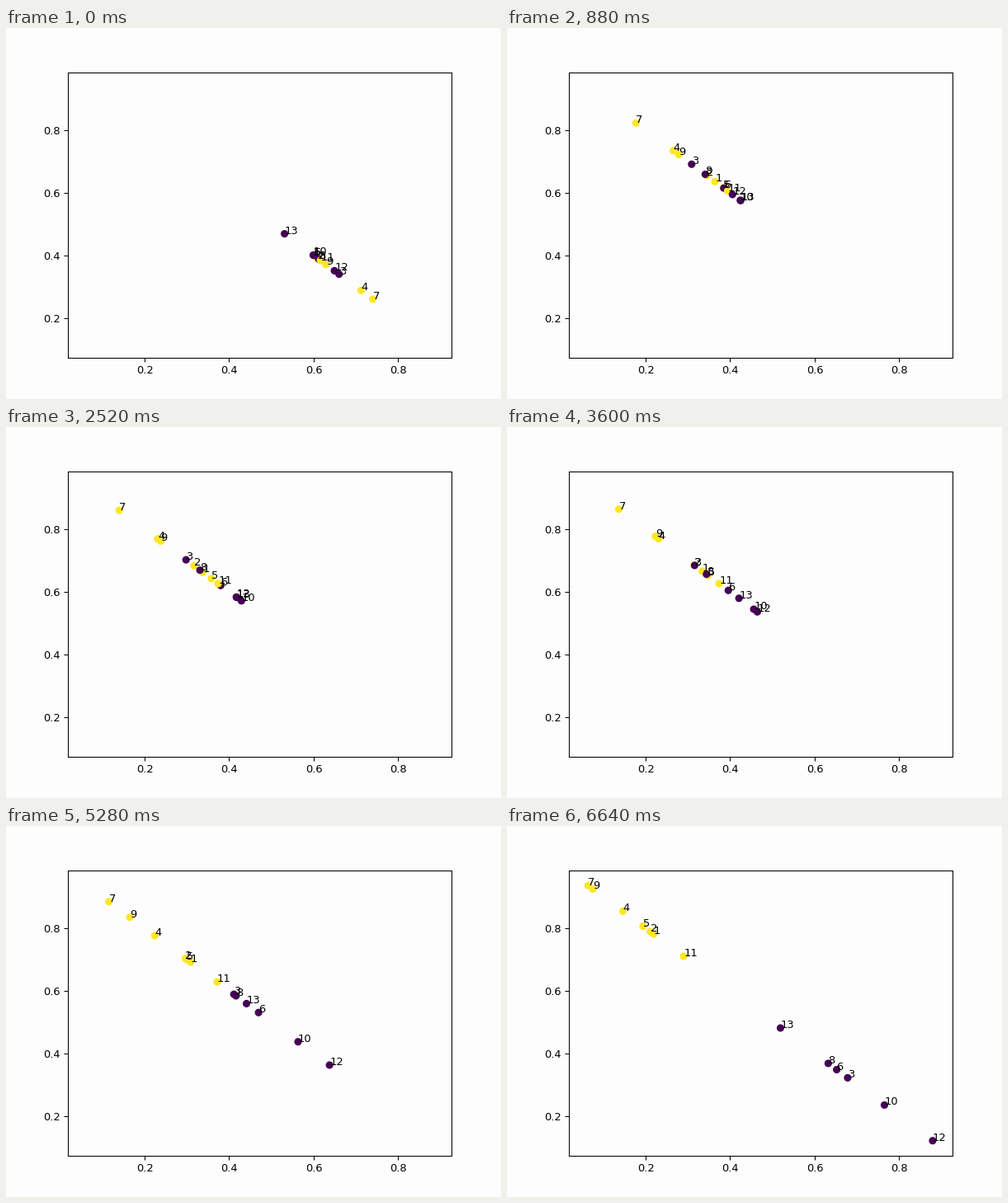
These frames come from a looping animation (600x450 px, 6.68 s). A matplotlib script:

```python
import numpy as np
import matplotlib.pyplot as plt
from matplotlib.animation import FuncAnimation

FRAMES, STEP = 167, 40
END = (FRAMES - 1) * STEP
SPLIT = 2520  # moment when the two classes begin to separate
PURPLE, YELLOW = "#440154", "#fde725"

# Per node: start, plateau and final probability, then growth rate
NODES = [
    (0.616, 0.338, 0.219, 4.4),
    (0.610, 0.317, 0.211, 5.2),
    (0.660, 0.298, 0.678, 3.3),
    (0.712, 0.231, 0.146, 8.0),
    (0.601, 0.358, 0.194, 3.3),
    (0.600, 0.380, 0.652, 3.1),
    (0.740, 0.140, 0.064, 4.0),
    (0.612, 0.331, 0.632, 3.5),
    (0.629, 0.238, 0.075, 3.0),
    (0.599, 0.429, 0.765, 2.7),
    (0.616, 0.374, 0.290, 11.0),
    (0.649, 0.417, 0.879, 2.5),
    (0.531, 0.418, 0.519, 4.3),
]


def logit(p):
    return np.log(p / (1 - p))


def ease(u):
    return (1 - np.cos(np.pi * np.clip(u, 0, 1))) / 2


def probability(t):
    """Overshoot, ring down to the plateau, then drift apart exponentially."""
    rebound = -0.095 * plateau - 0.04 * final
    z = start
    stops = [(520, 1.44 * plateau), (880, plateau + rebound),
             (1240, plateau - 0.2 * rebound), (1600, plateau)]
    begin = 0
    for stop, value in stops:
        z = z + (value - z) * ease((t - begin) / (stop - begin))
        begin = stop
    u = max(0, (t - SPLIT) / (END - SPLIT))
    z = z + (final - plateau) * np.expm1(rate * u) / np.expm1(rate)
    return 1 / (1 + np.exp(-z))


params = np.array(NODES).T
start, plateau, final = logit(params[:3])
rate = params[3]
colors = np.where(final < -0.5, YELLOW, PURPLE)

fig, ax = plt.subplots(figsize=(6.4, 4.8), dpi=93.75, facecolor="#fefdfe")
fig.subplots_adjust(left=0.125, right=0.9, bottom=0.1105, top=0.88)
ticks = np.arange(1, 5) / 5
ax.set(xlim=(0.0185, 0.926), ylim=(0.0722, 0.984),
       xticks=ticks, yticks=ticks, facecolor="#fefdfe")

dots = ax.scatter(params[0], 1 - params[0], s=36, c=colors)
labels = [ax.text(0, 0, str(n + 1)) for n in range(len(NODES))]


def draw(frame):
    x = probability(frame * STEP)
    points = np.column_stack([x, 1 - x])
    dots.set_offsets(points)
    for label, point in zip(labels, points):
        label.set_position(point)
    return [dots, *labels]


anim = FuncAnimation(fig, draw, frames=FRAMES, interval=STEP,
                     repeat=True, repeat_delay=0)
plt.show()
```
